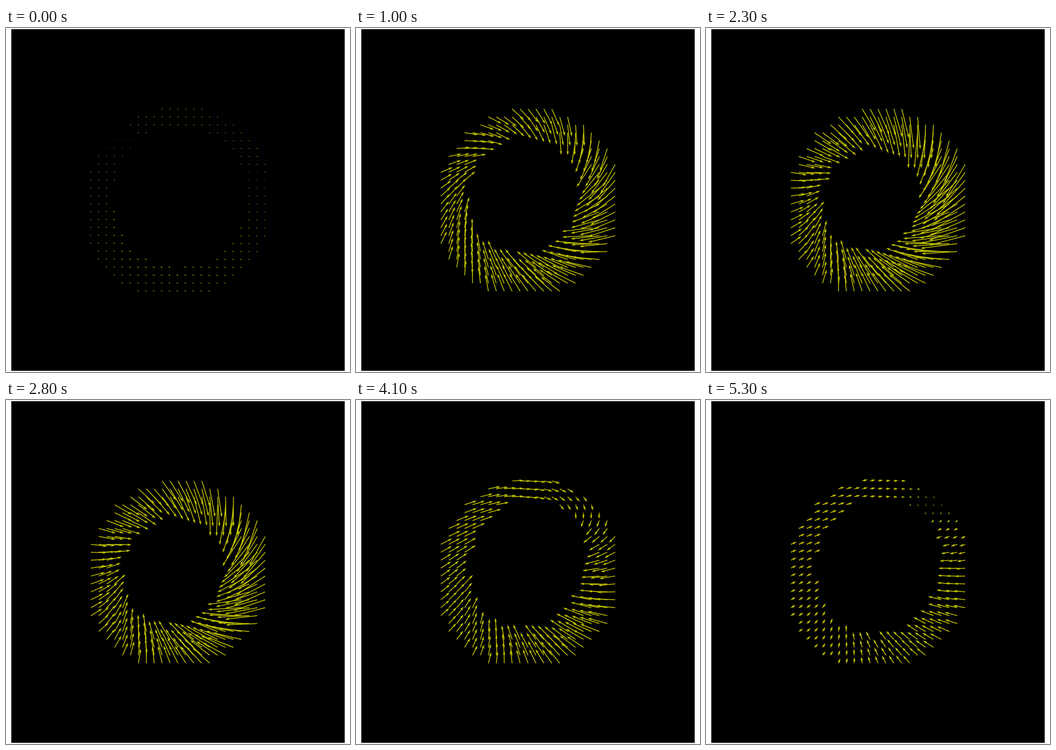
These frames come from a looping animation (748 px wide and 748 px high, 5.4 s). An HTML page with a canvas:

```html
<!DOCTYPE html>
<html lang="en">
<head>
<meta charset="utf-8">
<title>Displacement field</title>
<style>
  html, body { margin: 0; width: 100%; height: 100%; overflow: hidden; background: #fff; }
  canvas { display: block; }
</style>
</head>
<body>
<canvas id="stage" width="748" height="748"></canvas>
<script>
const ctx = document.getElementById('stage').getContext('2d');
const LOOP = 5400, STEP = 100;
const GRID = { x: 184.5, y: 176, pitch: 17.23, cols: 23, rows: 24 };
const CENTER = 374, INNER_RADIUS = 155;
const SHAFT = 1.75;

// One heartbeat: the ring drifts, squeezes inwards, twists clockwise and shears.
const BEAT = [
  { t: 0, driftX: -2.1, driftY: -1.1, squeeze: 0.4, twist: 1.6, shear: 0 },
  { t: 200, driftX: -7, driftY: -3, squeeze: 5, twist: 9, shear: 0 },
  { t: 600, driftX: -14.5, driftY: -4.4, squeeze: 26.5, twist: 25.8, shear: 0 },
  { t: 1500, driftX: -11.1, driftY: 7.4, squeeze: 45, twist: 27.9, shear: 0 },
  { t: 2300, driftX: -16.1, driftY: 12.8, squeeze: 53, twist: 29, shear: 0 },
  { t: 3200, driftX: -6.3, driftY: 6.1, squeeze: 41.6, twist: 23.1, shear: 1.5 },
  { t: 4100, driftX: -3.3, driftY: -10.3, squeeze: 23.8, twist: 15.3, shear: 5.9 },
  { t: 5300, driftX: -3.3, driftY: -6.3, squeeze: 13.3, twist: 6.8, shear: 5 }
];

function hermite(p0, p1, m0, m1, u) {
  const u2 = u * u, u3 = u2 * u;
  return (2 * u3 - 3 * u2 + 1) * p0 + (u3 - 2 * u2 + u) * m0 +
    (3 * u2 - 2 * u3) * p1 + (u3 - u2) * m1;
}

function slope(k, name) {
  const a = BEAT[Math.max(k - 1, 0)], b = BEAT[Math.min(k + 1, BEAT.length - 1)];
  return (b[name] - a[name]) / (b.t - a.t);
}

function poseAt(time) {
  let k = 0;
  while (k < BEAT.length - 2 && time >= BEAT[k + 1].t) k++;
  const a = BEAT[k], b = BEAT[k + 1], span = b.t - a.t;
  const u = Math.min((time - a.t) / span, 1);
  const pose = {};
  for (const name in a) {
    pose[name] = hermite(a[name], b[name], slope(k, name) * span, slope(k + 1, name) * span, u);
  }
  return pose;
}

// The wall lies between a slightly tilted outer oval and a narrower inner one.
function inWall(col, row) {
  const x = col - 11, y = row - 11.88;
  const outer = 1.02 * x * x + 0.98 * y * y + 0.06 * x * y;
  const inner = 1.1 * (col - 11.3) ** 2 + (row - 11.15) ** 2;
  return outer < 147.55 && inner > 78.6;
}

function makePoint(col, row) {
  const x = GRID.x + col * GRID.pitch, y = GRID.y + row * GRID.pitch;
  const angle = Math.atan2(y - CENTER, x - CENTER);
  const depth = Math.hypot(x - CENTER, y - CENTER) - INNER_RADIUS;
  // Outer layers lag behind the inner ones, most of all at the lower left.
  const lag = depth * (0.0009 + 0.0052 * Math.cos(angle - 2.53));
  return { x, y, angle: angle + lag, gain: 1 - 0.0012 * depth };
}

const points = [];
for (let row = 0; row < GRID.rows; row++) {
  for (let col = 0; col < GRID.cols; col++) {
    if (inWall(col, row)) points.push(makePoint(col, row));
  }
}

// Adds the vector (re, im) turned by the given angle.
function addTurned(sum, re, im, angle) {
  const c = Math.cos(angle), s = Math.sin(angle);
  sum.x += re * c - im * s;
  sum.y += re * s + im * c;
}

function displacement(pose, angle) {
  const { driftX, driftY, squeeze, twist, shear } = pose;
  const sum = { x: driftX, y: driftY };
  addTurned(sum, -squeeze, twist, angle);
  addTurned(sum, -shear, -0.8 * shear, -angle);
  addTurned(sum, -0.17 * squeeze - 0.2 * shear, 0.05 * squeeze + 0.5 * shear, 2 * angle);
  return sum;
}

function drawArrow(x, y, dx, dy) {
  const length = Math.hypot(dx, dy);
  ctx.beginPath();
  if (length < SHAFT) {
    ctx.arc(x, y, SHAFT / 2, 0, 2 * Math.PI);
    ctx.fill();
    return;
  }
  const w = SHAFT * Math.min(1, length / (5 * SHAFT));
  const ux = dx / length, uy = dy / length;
  const outline = [
    [0, 0.5 * w], [length - 4.5 * w, 0.5 * w], [length - 5 * w, 1.5 * w], [length, 0],
    [length - 5 * w, -1.5 * w], [length - 4.5 * w, -0.5 * w], [0, -0.5 * w]
  ];
  for (const [along, across] of outline) {
    ctx.lineTo(x + along * ux - across * uy, y + along * uy + across * ux);
  }
  ctx.fill();
}

function draw(time) {
  ctx.fillStyle = '#fff';
  ctx.fillRect(0, 0, 748, 748);
  ctx.fillStyle = '#000';
  ctx.fillRect(11.5, 2.5, 725, 743);
  ctx.fillStyle = '#bfbf00';
  const pose = poseAt(time);
  for (const { x, y, angle, gain } of points) {
    const d = displacement(pose, angle);
    drawArrow(x, y, gain * d.x, gain * d.y);
  }
}

const began = performance.now();
function tick() {
  const elapsed = (performance.now() - began) % LOOP;
  draw(Math.floor(elapsed / STEP) * STEP);
  requestAnimationFrame(tick);
}
tick();
</script>
</body>
</html>
```
